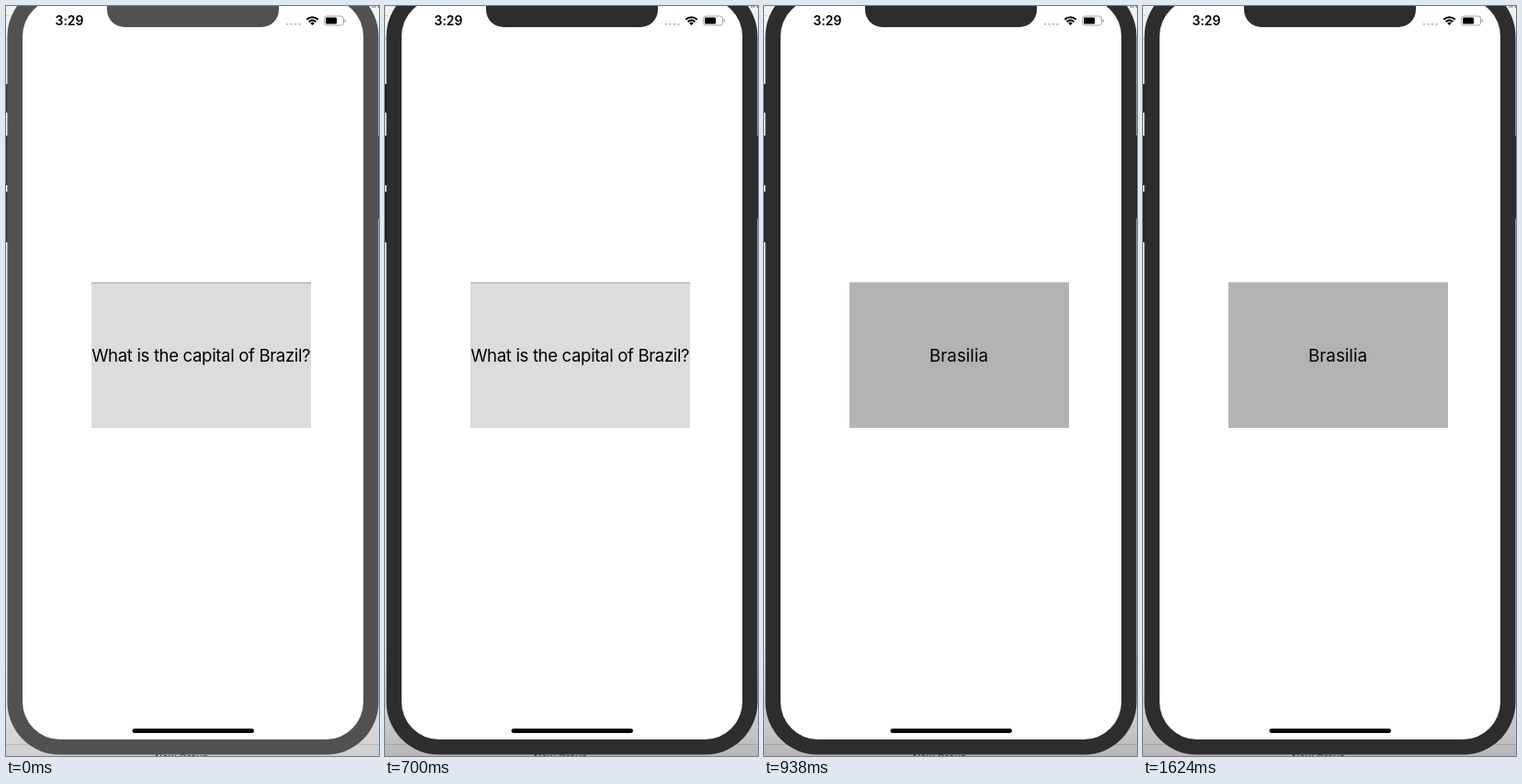
An HTML page with a canvas for the animation above (1.96 s loop, 406 by 816 pixels).

```html
<!DOCTYPE html>
<html lang="en">
<head>
<meta charset="utf-8">
<title>Flash card</title>
<style>
html, body { margin: 0; width: 100%; height: 100%; overflow: hidden; background: #fff; }
canvas { display: block; width: 406px; height: 816px; }
</style>
</head>
<body>
<canvas id="stage"></canvas>
<script>
const W = 406, H = 816, LOOP = 1960, FOCUS = 700, FLIP = 770;
const canvas = document.getElementById('stage');
const ctx = canvas.getContext('2d');
const scale = window.devicePixelRatio || 1;
canvas.width = W * scale;
canvas.height = H * scale;
ctx.scale(scale, scale);

function rect(x, y, w, h, fill) {
  ctx.fillStyle = fill;
  ctx.fillRect(x, y, w, h);
}

function round(x, y, w, h, r, fill) {
  ctx.beginPath();
  ctx.roundRect(x, y, w, h, r);
  ctx.fillStyle = fill;
  ctx.fill();
}

function text(str, x, y, font, spacing = 0, align = 'left', fill = '#000') {
  ctx.font = font + ' Inter, Roboto, sans-serif';
  ctx.letterSpacing = spacing + 'px';
  ctx.textAlign = align;
  ctx.fillStyle = fill;
  ctx.fillText(str, x, y);
}

function backdrop(focused) {
  rect(0, 0, W, H, '#f1f1f1');
  rect(0, 10, 3, 1, '#cfcfcf');
  rect(0, 36, 3, 1, '#d8d8d8');
  rect(0, 803, W, 1, '#d2d2d2');
  const shade = ctx.createLinearGradient(0, 700, 0, H);
  shade.addColorStop(0, 'rgba(0,0,0,0)');
  shade.addColorStop(1, focused ? 'rgba(0,0,0,.24)' : 'rgba(0,0,0,.14)');
  ctx.fillStyle = shade;
  ctx.fillRect(0, 700, W, H - 700);
  text('in', 398, 2, '10px', 0, 'left', '#555');
  text('New Group', 162, 822, '11px', 0, 'left', '#333');
}

function phone(body, button) {
  for (const [y, h] of [[85, 31], [141, 54], [202, 55]]) rect(0, y, 3, h, button);
  rect(403, 141, 3, 90, button);
  round(1.5, -24, 404, 838.5, 57, body);
  round(18, -8, 371, 806, 41, '#fff');
  round(110, -20, 187, 43, 19, body);
}

function wifi() {
  const x = 333.5, y = 21;
  ctx.strokeStyle = '#000';
  ctx.lineWidth = 2;
  for (const r of [5.4, 8.8]) {
    ctx.beginPath();
    ctx.arc(x, y, r, -Math.PI * 0.75, -Math.PI * 0.25);
    ctx.stroke();
  }
  ctx.beginPath();
  ctx.moveTo(x, y);
  ctx.arc(x, y, 3.2, -Math.PI * 0.75, -Math.PI * 0.25);
  ctx.fillStyle = '#000';
  ctx.fill();
}

function statusBar() {
  text('3:29', 53.6, 21, '600 14px', -0.1);
  for (let i = 0; i < 4; i++) round(304.6 + i * 4.5, 18.4, 2.8, 2.8, 1.4, '#c9c9c9');
  wifi();
  ctx.beginPath();
  ctx.roundRect(346.5, 11, 21, 10, 2.8);
  ctx.strokeStyle = '#a6a6a6';
  ctx.lineWidth = 1;
  ctx.stroke();
  round(348, 12.5, 12, 7, 1.3, '#000');
  round(368.6, 14.2, 1.4, 3.6, [0, 1.4, 1.4, 0], '#a6a6a6');
}

function card(flipped) {
  rect(93, 300.5, 239, 158.5, '#b3b3b3');
  if (flipped) {
    text('Brasilia', 212, 387, '18.8px', 0, 'center');
  } else {
    rect(93, 302, 239, 157, '#dcdcdc');
    text('What is the capital of Brazil?', 212.2, 387, '18.6px', -0.36, 'center');
  }
}

function draw(t) {
  const focused = t >= FOCUS;
  backdrop(focused);
  phone(focused ? '#2d2d2d' : '#515151', focused ? '#202020' : '#3d3d3d');
  statusBar();
  card(t >= FLIP);
  round(137.5, 786.3, 132.5, 4.6, 2.3, '#000');
}

const start = performance.now();
function tick() {
  draw((performance.now() - start) % LOOP);
  requestAnimationFrame(tick);
}
tick();
</script>
</body>
</html>
```
